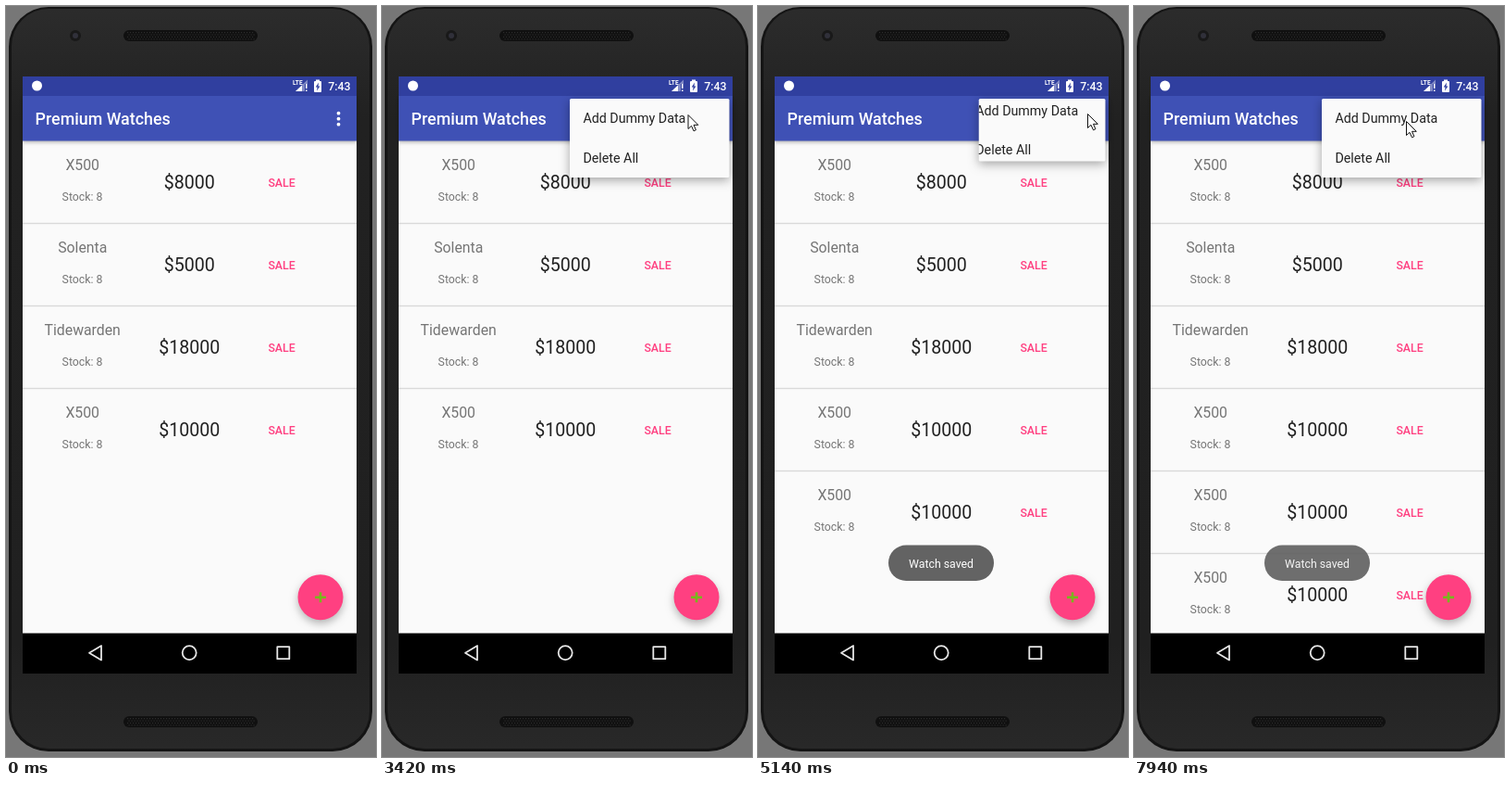
Animation of 400x810 px, one loop 8000 ms. Source, as an HTML page with a canvas:

```html
<!DOCTYPE html>
<html lang="en">
<head>
<meta charset="utf-8">
<title>Watch inventory</title>
<style>
html, body { margin: 0; width: 100%; height: 100%; overflow: hidden; background: #777; }
canvas { display: block; }
</style>
</head>
<body>
<canvas id="stage" width="400" height="810"></canvas>
<script>
const ctx = document.getElementById('stage').getContext('2d');
const LOOP = 8000;
const STEP = 140; // approximate refresh interval of the picture while something moves
const TOAST_HANDOVER = 6455;
const PINK = '#ff4081';
const WATCHES = [['X500', 8000], ['Solenta', 5000], ['Tidewarden', 18000]];

// Each action carries the cursor from wherever it was to x, y.
const ACTIONS = [
  { kind: 'move', start: 840, end: 1110, x: 248, y: 448 },
  { kind: 'move', start: 1510, end: 1660, x: 297, y: 292 },
  { kind: 'move', start: 1970, end: 2570, x: 350, y: 118 },
  { kind: 'open', start: 2850, end: 3580, x: 311, y: 116, pressed: true },
  { kind: 'pick', start: 4010, end: 4700, x: 356, y: 116 },
  { kind: 'open', start: 5140, end: 5530, x: 299, y: 123 },
  { kind: 'pick', start: 5990, end: 6810, x: 358, y: 125 },
  { kind: 'open', start: 7110, end: 7660, x: 294, y: 124 }
];

const clamp = v => Math.max(0, Math.min(1, v));
const mix = (a, b, k) => a + (b - a) * k;

function toastAlpha(t) {
  const fade = (from, to) => clamp(Math.min((t - from) / 250, (to - t) / 500));
  return Math.max(fade(4010, TOAST_HANDOVER), fade(TOAST_HANDOVER, LOOP + 405));
}

function sceneAt(now) {
  const index = ACTIONS.findLastIndex(a => a.start <= now);
  const picks = ACTIONS.filter(a => a.kind === 'pick' && a.start <= now).length;
  const scene = { rows: 4 + picks, toast: toastAlpha(now) };
  if (index < 0) return scene;

  const { kind, start, end, x, y, pressed } = ACTIONS[index];
  const from = index ? ACTIONS[index - 1] : { x: 132, y: 881 };
  const steps = Math.round((end - start) / STEP) + 1;
  const interval = (end - start) / (steps - 1);
  const i = Math.min(steps - 1, Math.floor((now - start) / interval + 1e-6));
  const k = kind === 'move' ? (i + 1) / steps : clamp((i - 1) / (steps - 2));

  scene.cursor = { x: mix(from.x, x, k), y: mix(from.y, y, k) };
  if (now < end) scene.toast = toastAlpha(start + i * interval);
  if (kind === 'open') {
    const age = i - (pressed ? 1 : 0);
    if (age < 0) scene.pressed = true;
    else scene.menu = { scale: age ? 1 : 0.793, alpha: 1 };
  }
  if (kind === 'pick' && i < 2) {
    scene.menu = { scale: 1, alpha: i ? 0.22 : 0.95, rippleX: from.x - 3 };
  }
  return scene;
}

function rect(x, y, w, h, fill) {
  ctx.fillStyle = fill;
  ctx.fillRect(x, y, w, h);
}

function round(x, y, w, h, r, fill) {
  ctx.beginPath();
  ctx.roundRect(x, y, w, h, r);
  ctx.fillStyle = fill;
  ctx.fill();
}

function disc(x, y, r, fill) {
  round(x - r, y - r, 2 * r, 2 * r, r, fill);
}

function poly(points, fill, stroke, width = 1) {
  ctx.beginPath();
  points.forEach(([x, y]) => ctx.lineTo(x, y));
  ctx.closePath();
  if (fill) { ctx.fillStyle = fill; ctx.fill(); }
  if (stroke) { ctx.strokeStyle = stroke; ctx.lineWidth = width; ctx.stroke(); }
}

function label(text, x, y, size, fill, { align = 'left', weight = 400 } = {}) {
  ctx.font = `${weight} ${size}px Roboto, sans-serif`;
  ctx.textAlign = align;
  ctx.fillStyle = fill;
  ctx.fillText(text, x, y);
}

function withShadow(color, blur, dy, draw) {
  ctx.save();
  ctx.shadowColor = color;
  ctx.shadowBlur = blur;
  ctx.shadowOffsetY = dy;
  draw();
  ctx.restore();
}

function drawSpeaker(y) {
  round(127, y, 145, 12, 6, '#101010');
  for (let row = 0; row < 4; row++) {
    for (let x = 131 + (row % 2) * 1.5; x < 269; x += 3) {
      rect(x, y + 2 + row * 2.4, 1.2, 1.2, '#2c2c2c');
    }
  }
}

function drawPhone() {
  rect(0, 0, 400, 810, '#777');
  round(3, 1, 393, 803, 43, '#141414');
  const body = ctx.createLinearGradient(0, 0, 0, 810);
  body.addColorStop(0, '#2c2c2c');
  body.addColorStop(0.15, '#212121');
  body.addColorStop(0.85, '#202020');
  body.addColorStop(1, '#292929');
  round(6, 3, 387, 798, 40, body);
  disc(75, 32, 6, '#191919');
  disc(75, 32, 3, '#30303a');
  drawSpeaker(26);
  drawSpeaker(766);
}

function drawStatusBar() {
  rect(18, 76, 361, 21, '#303f9f');
  disc(33.5, 86, 5.5, '#fff');
  label('LTE', 310, 85, 6.5, '#fff', { weight: 700 });
  poly([[313, 92], [326, 92], [326, 79.5]], 'rgba(255,255,255,.4)');
  poly([[313, 92], [320, 92], [320, 85.5]], '#fff');
  rect(323, 84, 3, 9, '#303f9f');
  rect(324, 84, 1.5, 5, '#fff');
  rect(324, 90.5, 1.5, 1.5, '#fff');
  round(333, 81, 8, 12, 1, '#fff');
  rect(335, 79.5, 4, 2, '#fff');
  poly([[338, 82.5], [334.7, 87.6], [336.6, 87.6], [336, 91.5], [339.4, 86.4], [337.5, 86.4]], '#303f9f');
  label('7:43', 372.5, 91, 12.3, '#fff', { align: 'right', weight: 500 });
}

function drawToolbar(pressed) {
  withShadow('rgba(0,0,0,.3)', 4, 1, () => rect(18, 97, 361, 48.5, '#3f51b5'));
  drawStatusBar();
  label('Premium Watches', 31.6, 128, 17.85, '#fff', { weight: 500 });
  if (pressed) disc(356, 120, 11, 'rgba(255,255,255,.12)');
  for (let i = -1; i <= 1; i++) disc(359.5, 121.7 + i * 6, 1.9, '#fff');
}

function drawRow(i) {
  const [name, price] = WATCHES[i] || ['X500', 10000];
  const y = 146 + i * 89;
  const center = { align: 'center' };
  if (i) rect(18, y - 1.2, 361, 1.4, '#d9d9d9');
  label(name, 82.7, y + 31, 15.8, '#757575', center);
  label('Stock: 8', 82.5, y + 64.4, 12.3, '#757575', center);
  label('$' + price, 198.3, y + 51, 19.6, '#212121', center);
  label('SALE', 298, y + 48.5, 12.3, PINK, { align: 'center', weight: 500 });
}

function drawFab() {
  withShadow('rgba(0,0,0,.28)', 8, 4, () => disc(340, 637.7, 24.5, PINK));
  rect(334, 636.5, 12, 2.6, '#78b81c');
  rect(338.7, 632.3, 2.6, 11, '#78b81c');
}

function drawNavBar() {
  rect(18, 676.5, 361, 43.5, '#000');
  ctx.lineJoin = 'round';
  poly([[90, 697.7], [103, 690], [103, 705.4]], null, '#e6e6e6', 1.8);
  ctx.beginPath();
  ctx.arc(198.2, 697.6, 7.5, 0, Math.PI * 2);
  ctx.stroke();
  ctx.strokeRect(293.3, 691.2, 13, 13);
}

function drawMenu({ scale, alpha, rippleX }) {
  const w = 172.5 * scale, h = 85 * scale, x = 375.5 - w;
  const dx = (172.5 - w) / 2, dy = (h - 85) / 2;
  ctx.save();
  ctx.globalAlpha = alpha;
  withShadow('rgba(0,0,0,.35)', 11, 3, () => round(x, 100, w, h, 1.5, '#fafafa'));
  ctx.beginPath();
  ctx.rect(x, 100, w, h);
  ctx.clip();
  if (rippleX && alpha > 0.5) {
    ctx.save();
    ctx.beginPath();
    ctx.rect(x, 100, w, 42.5);
    ctx.clip();
    rect(x, 100, w, 42.5, 'rgba(0,0,0,.04)');
    disc(rippleX, 122, 47, 'rgba(0,0,0,.05)');
    ctx.restore();
  }
  ctx.globalAlpha = Math.max(alpha, 0.35);
  label('Add Dummy Data', 217.4 + dx, 126.3 + dy, 14.25, '#212121');
  label('Delete All', 217.4 + dx, 168.5 + dy, 14.25, '#212121');
  ctx.restore();
}

function drawToast(alpha) {
  ctx.save();
  ctx.globalAlpha = alpha;
  round(141, 581.5, 114, 38.5, 19.2, '#636363');
  label('Watch saved', 198, 605.7, 12.3, '#fff', { align: 'center' });
  ctx.restore();
}

function drawCursor({ x, y }) {
  ctx.save();
  ctx.translate(x + 0.5, y + 0.5);
  ctx.lineJoin = 'miter';
  poly([[0, 0], [0, 15], [3.5, 11.8], [6, 17.3], [8.4, 16.2], [6, 10.8], [10.8, 10.8]], '#fff', '#111');
  ctx.restore();
}

function draw({ rows, toast, pressed, menu, cursor }) {
  drawPhone();
  rect(18, 145, 361, 532, '#fafafa');
  for (let i = 0; i < rows; i++) drawRow(i);
  drawToolbar(pressed);
  drawFab();
  drawNavBar();
  drawToast(toast);
  if (menu) drawMenu(menu);
  if (cursor) drawCursor(cursor);
}

function frame() {
  draw(sceneAt(performance.now() % LOOP));
  requestAnimationFrame(frame);
}
frame();
</script>
</body>
</html>
```
